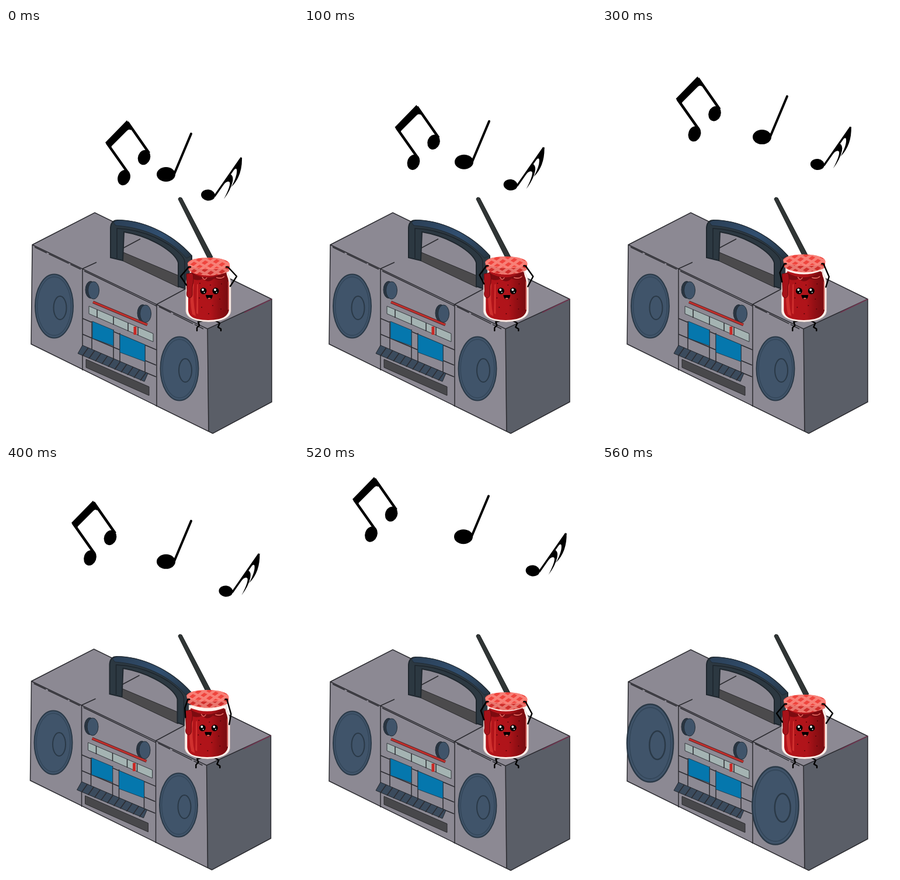
These frames come from a looping animation (500x700 px, 660 ms). An HTML page:

```html
<!DOCTYPE html>
<html lang="en">
<head>
<meta charset="utf-8">
<title>Dancing jam jar</title>
<style>
  html, body { margin: 0; width: 100%; height: 100%; overflow: hidden; background: #fff; }
  svg { display: block; width: 100vw; height: 100vh; }
  .line { fill: none; stroke: #2b2b30; stroke-width: 1.5; }
  .limb { fill: none; stroke: #000; stroke-width: 2.4; stroke-linecap: round; stroke-linejoin: round; }
  .cone { fill: #40546a; stroke: #2a3947; stroke-width: 2; }
</style>
</head>
<body>
<svg viewBox="0 0 500 700">
  <defs>
    <linearGradient id="jam">
      <stop offset="0" stop-color="#b3141a"/><stop offset=".55" stop-color="#b0141a"/>
      <stop offset=".75" stop-color="#930f14"/><stop offset="1" stop-color="#760b10"/>
    </linearGradient>
    <linearGradient id="grip" x2="1" y2="1">
      <stop offset="0" stop-color="#2b3f55"/><stop offset=".5" stop-color="#314f70"/><stop offset="1" stop-color="#263542"/>
    </linearGradient>
    <pattern id="check" width="11" height="11" patternUnits="userSpaceOnUse" patternTransform="rotate(28) skewX(-25)">
      <path d="M0 0H5V11H0Z M0 0H11V4H0Z" fill="#ffb0a6" opacity=".55"/>
    </pattern>
    <g id="speaker">
      <ellipse class="cone" rx="32.5" ry="54.5"/>
      <ellipse rx="29" ry="50" fill="none" stroke="#34475a" stroke-width="1.5"/>
      <ellipse class="cone" cx="10" cy="3" rx="11" ry="20"/>
    </g>
    <g id="knob" stroke="#222d37">
      <ellipse cx="-3" cy="-1" rx="9" ry="14.5" fill="#2a3541"/>
      <ellipse cx="2" rx="9.5" ry="15" fill="#40546a"/>
    </g>
    <g id="eye"><circle r="5.5"/><circle cx="-1" cy="-2" r="2" fill="#fff"/><circle cx="1.5" cy="2.5" r="1" fill="#fff"/></g>
  </defs>

  <g id="box">
    <path d="M45 371 152 316 455 464V640L354 694 43 541Z" fill="#8c8993"/>
    <path d="M345 515 455 464V640L354 694 346 690Z" fill="#5a5e67"/>
    <path class="line" d="M45 371 152 316 455 464V640L354 694 43 541Z M45 371 345 515 455 464M345 515 347 690"/>
    <path d="M408 487 455 464" stroke="#73344f" stroke-width="1.5"/>
    <path class="line" d="M131 412V586M258 473V648M131 412 155 401M258 473 312 444M134 416 258 476M200 377 230 361"/>
    <path class="line" stroke-dasharray="23 4 38 3" d="M49 375 128 413M262 477 338 515"/>

    <path d="M201 384 296 424V444L199 398Z" fill="#4b4a4c" stroke="#29292c"/>
    <path d="M179 393V342Q180 329 191 329C230 329 282 349 318 390V440L306 446 295 442V402C290 384 250 357 202 349L200 398Z" fill="#2c3841" stroke="#1f272e" stroke-width="2"/>
    <path d="M184 333Q188 328 198 329C238 331 284 352 318 390L309 394C276 356 230 341 188 338Z" fill="url(#grip)" stroke="#202a33"/>
    <path d="M190 394V343Q237 345 279 371 305 389 306 400V444" fill="none" stroke="#1d252c" stroke-width="1.5"/>

    <use href="#knob" x="148" y="449"/>
    <use href="#knob" x="237" y="489"/>
    <path d="M149 469 242 508" stroke="#5a2a2d" stroke-width="5"/>
    <path d="M149 469 242 508" stroke="#c62f2b" stroke-width="2.8"/>
    <path d="M142 476 252 523V537L142 489Z" fill="#a4b3b2" stroke="#34393d"/>
    <path class="line" d="M156 482V496M184 494V508M209 505V519M226 512V526"/>
    <path d="M221 511V525" stroke="#c82a27" stroke-width="5"/>
    <path class="line" d="M131 497 258 551M131 524 257 577M131 545 257 597M147 502V552M184 516V567M195 522V572M238 542V590"/>
    <path d="M148 502 184 517V544L148 531ZM195 524 238 542V571L195 555Z" fill="#0577ad" stroke="#244154"/>
    <path d="M131 543 243 591 237 605 123 557Z" fill="#3b4b5d" stroke="#23282e"/>
    <path id="keys" class="line" stroke-width="2"/>
    <path d="M137 567 245 614V629L137 581Z" fill="#48484b" stroke="#2b2b2e"/>
    <use id="left" href="#speaker"/>
    <use id="right" href="#speaker"/>
  </g>

  <path d="M295 293Q296 288 301 291L354 392 346 395Z" fill="#303535" stroke="#1c2020"/>

  <g id="jar">
    <path class="limb" d="M340 500 329 503 331 509 327 513V518M357 500 366 505 363 512 368 515V518"/>
    <path d="M315 411V419Q308 427 308 441V485Q310 501 347 503 383 501 385 485V441Q385 427 379 419V411Z" fill="#fff2ec" stroke="#d9c3bd" stroke-width=".7"/>
    <path d="M318 416Q346 427 375 416L380 428Q382 435 382 450V481Q381 494 365 498 346 502 327 498 313 495 312 483V443Q312 429 318 421Z" fill="url(#jam)"/>
    <path d="M317 418Q346 436 377 417L379 427Q368 434 356 429 346 438 338 429 326 435 317 427Z" fill="#7d0b10"/>
    <path d="M336 426Q340 434 344 427M360 427Q369 430 374 425" fill="none" stroke="#e2685f" stroke-width="1.5"/>
    <path d="M317 442Q314 470 319 490L325 493Q319 467 322 437ZM327 439 326 488 329 490V438Z" fill="#d93a36" opacity=".75"/>
    <path d="M309 421 319 419Q323 427 319 443V457Q317 464 312 461 308 458 310 450Z" fill="#a61219" stroke="#6f0a0e"/>
    <path d="M381 434V482" stroke="#e2746c" stroke-width="1.5"/>
    <g fill="#570509">
      <circle cx="332" cy="437" r="1"/><circle cx="350" cy="440" r="1"/><circle cx="369" cy="438" r="1"/>
      <circle cx="331" cy="462" r="1"/><circle cx="366" cy="464" r="1"/><circle cx="335" cy="478" r="1"/>
      <circle cx="354" cy="475" r="1"/><circle cx="347" cy="489" r="1"/><circle cx="368" cy="481" r="1"/>
    </g>
    <use href="#eye" x="338" y="450"/>
    <use href="#eye" x="359" y="450"/>
    <path d="M342 457H354Q353 465 348 465 343 464 342 457Z"/>
    <path d="M345 463Q348 460 351 463 348 466 345 463Z" fill="#ed5550"/>
    <g id="lid">
      <path id="cloth" d="M311 403C312 390 380 389 383 404L382 416Q376 419 372 420 346 428 320 419L313 415Z" fill="#ef443d"/>
      <path d="M312 403C316 414 376 416 383 405L382 416Q347 430 313 415Z" fill="#cf2e2b"/>
      <path d="M311 403C312 390 380 389 383 404L382 416Q376 419 372 420 346 428 320 419L313 415Z" fill="url(#check)"/>
      <path d="M312 403C316 414 376 416 383 405" fill="none" stroke="#ff8a80" stroke-width="1.2"/>
    </g>
    <path class="limb" id="arms"/>
  </g>

  <g id="notes">
    <g id="pair">
      <path d="M170 196 207 158 215 170 214 175Q211 172 207 176L181 202Q179 205 180 209Z"/>
      <path d="M173 197 209 248M208 161 245 214" stroke="#000" stroke-width="4.5"/>
      <ellipse cx="202" cy="256" rx="10.5" ry="13.5" transform="rotate(20 202 256)"/>
      <ellipse cx="236.500" cy="221.500" rx="10.500" ry="13" transform="rotate(20 236.5 221.5)"/>
    </g>
    <g id="single">
      <ellipse cx="274" cy="250.500" rx="16" ry="12.500"/>
      <path d="M288 250 317 181" stroke="#000" stroke-width="4" stroke-linecap="round"/>
    </g>
    <g id="flagged">
      <ellipse cx="346" cy="286" rx="12" ry="9.5" transform="rotate(8 346 286)"/>
      <path d="M357 288 403 222" stroke="#000" stroke-width="3.2"/>
      <path d="M404 221Q405 253 386 272 397 251 395 242 393 238 387 247ZM391 240 384 250Q390 253 388 263 385 277 373 293 385 270 383 264 379 260 371 270Z"/>
    </g>
  </g>
</svg>
<script>
const get = id => document.getElementById(id);
const move = (id, x, y, extra = "") => get(id).setAttribute("transform", `translate(${x} ${y}) ${extra}`);

// Time at which each pose begins, and how far the lid is raised in it.
const starts = [0, 100, 200, 300, 400, 500, 520, 540, 560];
const lifts = [0, 2, 4, 5.5, 8, 6, 4, 2, 0];
const loop = 660;

get("keys").setAttribute("d", Array.from({ length: 10 }, (_, i) =>
  `M${141 + i * 11} ${547 + i * 4.7}l-10 14`).join(""));

function draw(now) {
  const step = starts.findLastIndex(start => start <= now % loop);
  const lift = lifts[step];
  const raised = lift / 8;
  const last = step === starts.length - 1;

  get("notes").style.display = last ? "none" : "";
  move("pair", -14.5 * step, (0.68 * step - 27) * step);
  move("single", step > 4 ? -1 : 0, -21.3 * step);
  move("flagged", 7.6 * step, -17.5 * step);

  const shake = step === 4 ? -1 : 0;
  move("box", shake * 1.5, shake);
  const size = last ? "scale(1.22)" : "";
  move("left", 82.5, 476, size);
  move("right", 297, 583, size);

  move("jar", step === 0 || last ? 0 : shake - 0.7, 0);
  move("lid", 0, -lift);
  get("arms").setAttribute("d",
    `M309 ${440 - 8 * raised}L${299 + 9 * raised} ${425 - 9 * raised} 313 ${409 - lift}h3` +
    `M384 ${442 + 2 * raised}L${395 - 8 * raised} ${425 + raised} 380 ${409 - lift}h-3`);
}

function tick(now) {
  draw(now);
  requestAnimationFrame(tick);
}
draw(0);
requestAnimationFrame(tick);
</script>
</body>
</html>
```
